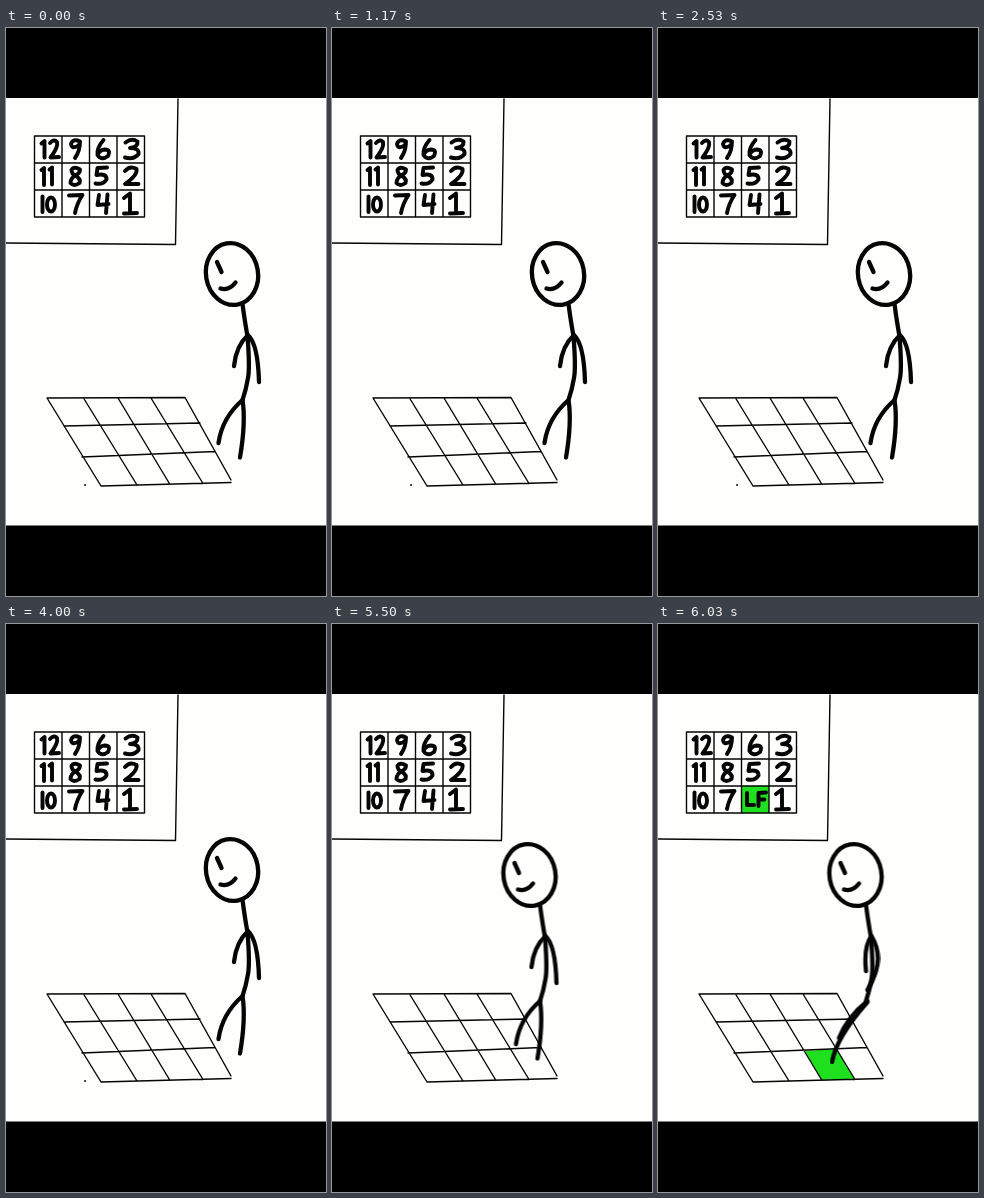
Write an HTML page without scripts that moves like this. It is 320 px wide and 568 px high and loops after 8 s.

```html
<!DOCTYPE html>
<html lang="en">
<head>
<meta charset="utf-8">
<title>Stepping on the grid</title>
<style>
  html, body { margin: 0; width: 100%; height: 100%; overflow: hidden; background: #000; }
  svg { display: block; width: 100%; height: 100%; }
  path, ellipse { fill: none; stroke: #050505; stroke-linecap: round; stroke-linejoin: round; }
  .thin { stroke-width: 1.4; }
  .digits { stroke-width: 3.9; }
  .limb { stroke-width: 4.3; }
  .green { fill: #1fe01f; stroke: none; }

  /* hard cuts: lift a foot, step over, land on the tile */
  .figure, .speck, .stand, .lift, .land, .four { animation: 8s step-end infinite; }
  .figure { animation-name: step; }
  .speck { animation-name: speck; }
  .stand { animation-name: stand; }
  .lift { animation-name: lift; }
  .land { animation-name: land; }
  .four { animation-name: four; }
  @keyframes step { 0% { transform: none; } 65.875%, 100% { transform: translate(-28.5px, 5px); } }
  @keyframes speck { 0% { opacity: 1; } 62.5%, 100% { opacity: 0; } }
  @keyframes stand { 0% { opacity: 1; } 62.5% { opacity: 0; } 65.875% { opacity: 1; } 72.125%, 100% { opacity: 0; } }
  @keyframes lift { 0% { opacity: 0; } 62.5% { opacity: 1; } 65.875%, 100% { opacity: 0; } }
  @keyframes land { 0% { opacity: 0; } 72.125%, 100% { opacity: 1; } }
  @keyframes four { 0% { opacity: 1; } 72.125%, 100% { opacity: 0; } }
</style>
</head>
<body>
<svg viewBox="0 0 320 568">
  <rect width="320" height="568" fill="#000"/>
  <rect y="70" width="320" height="427.500" fill="#fefefd"/>

  <!-- tiles that light up -->
  <g class="land">
    <path class="green" d="M83.500 162H111V189H83.500Z"/>
    <path class="green" d="M147 427L179 425L196.500 455L164 456.500Z"/>
  </g>

  <!-- wall chart -->
  <path class="thin" d="M172 71L169.500 216.500M0 215L169.500 216.500"/>
  <path class="thin" d="M28.500 108H138.500V189H28.500ZM28.500 135H138.500M28.500 162H138.500M56 108V189M83.500 108V189M111 108V189"/>
  <g class="digits">
    <path d="M35.500 115.500L38.500 113V129.500M44 115Q48 110.500 51 114Q52.500 119 44.500 129.500L53 129"/>
    <path d="M74 113.500Q67 110 65 116Q66 122 73 117L74 113.500Q74 123 69 130"/>
    <path d="M97.500 112Q90.500 120 91.500 127Q95.500 133 102 128Q105 121.500 99 121.500Q94 122 92 126"/>
    <path d="M119.500 114.500Q126 109.500 131.500 113.500Q132 119 124 120Q133.500 120 132.500 126Q128 132 119 129.500"/>
    <path d="M35.500 142L38 140V157M43.500 141.500L46 139.500V156.500"/>
    <path d="M74 141.500Q68 138 65.500 142Q65.500 146 70 148Q75 151 73.500 155Q68 159 64.500 155Q64.500 150 70 147Q74 145 74 141.500Z"/>
    <path d="M101 139.500L91.500 140L90.500 147Q101 145 100.500 151.500Q97 157 89.500 155.500"/>
    <path d="M119 143Q124 137 130.500 141Q132 147 119 156L132.500 156"/>
    <path d="M36.500 168.500V184"/><ellipse cx="45" cy="176.500" rx="4" ry="7"/>
    <path d="M63 167.500L76.500 167Q71 175 69 185"/>
    <path d="M118 170L124 165.500V185M118 185.500L131 185"/>
    <path class="four" d="M93 167L91.500 177L102.500 176M101.500 166.500L100 185"/>
    <path class="land" d="M89 169V181H96M100.500 182V169L108 168.500M100.500 175.500H106.500"/>
  </g>

  <!-- floor -->
  <path class="thin" d="M41 370L179 369.500L225 452M41 370L95 458L225 454.500M58 398L194 395M76 429L209 423.500M77.500 370L131 457M112 370L164 456.500M145 370L197 455.500"/>
  <path class="speck" stroke-width="1.800" d="M79 457h.1"/>

  <g class="figure limb">
    <ellipse cx="226" cy="246" rx="26" ry="31" transform="rotate(-10 226 246)"/>
    <path d="M211 234L215.500 244M214.500 260.500Q223 263 229.500 254.500"/>
    <path d="M236.500 276Q239 295 241.500 308Q244 340 242 350Q240 362 236.500 372"/>
    <path class="stand" d="M228 338Q230 318 242 307Q252 316 253 354M212.500 415Q216 390 236.500 372Q240 394 234 429.500"/>
    <g class="lift">
      <path d="M232 340.500Q233 318 241 307Q250 322 247 347.500M212.500 414.500Q216 390 236.500 372"/>
      <path d="M238 373Q222 389 221.500 395L229 414"/>
    </g>
    <g class="land">
      <path d="M236.500 342Q234 317 242 307Q252 324 246.500 342Q243 353 238 361"/>
      <path d="M209.500 409Q218 388 238 372M238 373Q207 408 202.500 433"/>
    </g>
  </g>
</svg>
</body>
</html>
```
